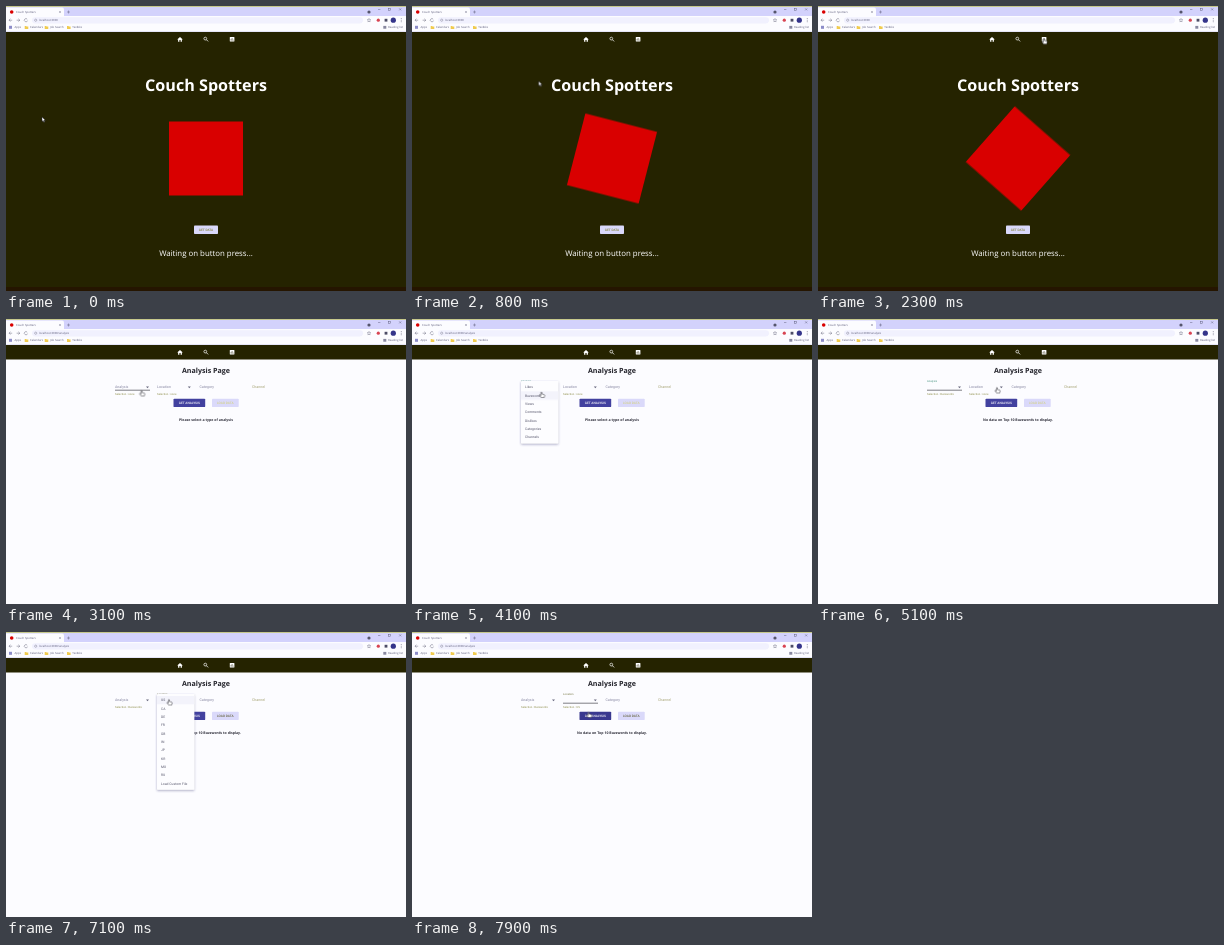
An HTML page that plays this animation: 400 px wide and 285 px high, repeating every 8 s.

```html
<!DOCTYPE html>
<html lang="en">
<head>
<meta charset="utf-8">
<title>Couch Spotters</title>
<style>
html, body { margin: 0; width: 100%; height: 100%; overflow: hidden; background: #fcfcff; }
svg { display: block; width: 100vw; height: 100vh; }
text { font-family: "Open Sans", "Noto Sans", sans-serif; text-rendering: geometricPrecision; }
.mid { text-anchor: middle; }
.ui { font-family: Roboto, Arial, sans-serif; }
.chrome text { font-size: 2.8px; fill: #5a5a78; }
.title { font-weight: 700; }
.msg { font-size: 3.52px; font-weight: 700; fill: #2c2c38; }
.btn { font-size: 3.2px; font-weight: 500; }
.label { font-size: 3.6px; fill: #83839f; }
.help { font-size: 2.75px; fill: #8c8c48; }
.menu text { font-size: 3.4px; fill: #55556a; }

/* one 8 s loop; 1.25% is one 100 ms step */
.home, .page, .before, .after, .before2, .after2, .line1, .line2,
.arrow, .hand, .hover, .pick1, .pick2 { animation: 8s step-end infinite; }
.home { animation-name: home; }
.page { animation-name: page; }
.before { animation-name: before; }
.after { animation-name: after; }
.before2 { animation-name: before2; }
.after2 { animation-name: after2; }
.line1 { animation-name: line1; }
.line2 { animation-name: line2; }
.arrow { animation-name: arrow; }
.hand { animation-name: hand; }
.hover { animation-name: hover; }
.pick1 { animation-name: pick1; }
.pick2 { animation-name: pick2; }
@keyframes home { 0% { opacity: 1 } 31.25%, to { opacity: 0 } }
@keyframes page { 0% { opacity: 0 } 31.25%, to { opacity: 1 } }
@keyframes before { 0% { opacity: 1 } 57.5%, to { opacity: 0 } }
@keyframes after { 0% { opacity: 0 } 57.5%, to { opacity: 1 } }
@keyframes before2 { 0% { opacity: 1 } 88.75%, to { opacity: 0 } }
@keyframes after2 { 0% { opacity: 0 } 88.75%, to { opacity: 1 } }
@keyframes line1 { 0% { opacity: 0 } 37.5% { opacity: 1 } 67.5%, to { opacity: 0 } }
@keyframes line2 { 0% { opacity: 0 } 67.5%, to { opacity: 1 } }
@keyframes arrow { 0% { opacity: 1 } 25% { opacity: 0 } 31.25% { opacity: 1 } 37.5%, to { opacity: 0 } }
@keyframes hand { 0% { opacity: 0 } 25% { opacity: 1 } 31.25% { opacity: 0 } 37.5%, to { opacity: 1 } }
@keyframes hover { 0% { fill: #42419f } 95%, to { fill: #39388f } }
@keyframes pick1 { 0% { transform: none } 51.25%, to { transform: translateY(8.35px) } }
@keyframes pick2 { 0% { transform: translateY(8.35px) } 82.5%, to { transform: none } }

.spin { animation: spin 8s steps(80) infinite; transform-origin: 200px 152.5px; }
@keyframes spin { to { transform: rotate(144deg) } }

.float1, .float2, .menu { animation: 8s steps(2) infinite; }
.float1 { animation-name: float1; transform-origin: 109px 69.4px; }
.float2 { animation-name: float2; transform-origin: 151px 69.4px; }
@keyframes float1 {
  0%, 43.75% { transform: none; fill: #83839f }
  46.25%, 67.5% { transform: translateY(-6px) scale(.75); fill: #43917c }
  70%, to { transform: none; fill: #83839f }
}
@keyframes float2 {
  0%, 67.5% { transform: none; fill: #83839f }
  70%, to { transform: translateY(-6px) scale(.75); fill: #6c6c34 }
}
.m1 { animation-name: menu1; transform-origin: 109px 62px; }
.m2 { animation-name: menu2; transform-origin: 151px 62px; }
@keyframes menu1 {
  0%, 42.5% { opacity: 0; transform: scale(.75, .56) }
  45%, 57.5% { opacity: 1; transform: none }
  60%, to { opacity: 0; transform: none }
}
@keyframes menu2 {
  0%, 67.5% { opacity: 0; transform: scale(.75, .56) }
  70%, 88.75% { opacity: 1; transform: none }
  91.25%, to { opacity: 0; transform: none }
}

.cursor { animation: cursor 8s infinite; }
@keyframes cursor {
  0% { transform: translate(36px, 111px) }
  3.75% { transform: translate(36px, 111px); animation-timing-function: steps(10) }
  16.25% { transform: translate(217.3px, 39.5px) }
  20% { transform: translate(217.3px, 39.5px); animation-timing-function: steps(4) }
  25% { transform: translate(226px, 32.5px) }
  31.25% { transform: translate(226px, 32.5px); animation-timing-function: steps(3) }
  35% { transform: translate(183px, 107px); animation-timing-function: steps(3) }
  38.75% { transform: translate(135.6px, 71.5px) }
  45% { transform: translate(135.6px, 71.5px); animation-timing-function: steps(5) }
  51.25% { transform: translate(129.5px, 73px); animation-timing-function: step-end }
  53.75% { transform: translate(129.5px, 74.5px) }
  57.5% { transform: translate(129.5px, 74.5px); animation-timing-function: steps(5) }
  63.75% { transform: translate(179px, 68.5px) }
  67.5% { transform: translate(179px, 68.5px); animation-timing-function: steps(6) }
  75% { transform: translate(167px, 75px) }
  77.5% { transform: translate(167px, 75px); animation-timing-function: steps(4) }
  82.5% { transform: translate(163px, 67.5px) }
  90% { transform: translate(163px, 67.5px); animation-timing-function: steps(5) }
  96.25%, to { transform: translate(176.6px, 80px) }
}
</style>
</head>
<body>
<svg viewBox="0 0 400 285" preserveAspectRatio="none">
  <defs>
    <filter id="shade" x="-20%" y="-10%" width="140%" height="125%">
      <feDropShadow dx="0" dy="1" stdDeviation="1" flood-color="#40407a" flood-opacity=".45"/>
    </filter>
    <path id="drop" d="M-1.5 -.7h3l-1.5 1.6z" fill="#66667c"/>
    <path id="folder" d="M0 -1.3h1.4l.5.5h1.7v2.5h-3.6z" fill="#f0cb4e"/>
  </defs>

  <rect width="400" height="285" fill="#fcfcff"/>

  <g class="home">
    <rect y="26" width="400" height="259" fill="#252300"/>
    <rect y="281" width="400" height="4" fill="#251500"/>
    <text class="title mid" x="200" y="84.6" font-size="16.15" fill="#fff">Couch Spotters</text>
    <rect class="spin" x="163" y="115.5" width="74" height="74" fill="#d90000"/>
    <rect x="188" y="219.5" width="24" height="8.6" rx=".8" fill="#d9d8fa"/>
    <text class="btn ui mid" x="200" y="225" fill="#86853f">GET DATA</text>
    <text class="mid" x="200" y="249.6" font-size="7.85" fill="#fff">Waiting on button press...</text>
  </g>

  <g class="page">
    <rect y="26" width="400" height="14.5" fill="#252300"/>
    <text class="title mid" x="200" y="53.7" font-size="7.1" fill="#24242c">Analysis Page</text>

    <g class="ui">
      <text class="label ui float1" x="109" y="69.4">Analysis</text>
      <text class="label ui float2" x="151" y="69.4">Location</text>
      <text class="label ui" x="193.5" y="69.4">Category</text>
      <text class="label ui" x="246" y="69.4" style="fill:#a3a070">Channel</text>
      <use href="#drop" x="141.5" y="68.3"/>
      <use href="#drop" x="183.3" y="68.3"/>
      <path class="line1" d="M109 71.2h35" stroke="#4a4a50" stroke-width=".7"/>
      <path class="line2" d="M151 71.2h35" stroke="#4a4a50" stroke-width=".7"/>
      <text class="help ui before" x="109" y="75.6">Selection : none</text>
      <text class="help ui after" x="109" y="75.6">Selection : Buzzwords</text>
      <text class="help ui before2" x="151" y="75.6">Selection : none</text>
      <text class="help ui after2" x="151" y="75.6">Selection : US</text>
    </g>

    <rect class="hover" x="167.5" y="79.7" width="31.7" height="8.4" rx=".9" fill="#42419f"/>
    <text class="btn ui mid" x="183.3" y="85.1" fill="#fff">GET ANALYSIS</text>
    <rect x="206" y="79.7" width="26.7" height="8.4" rx=".9" fill="#dad9fa"/>
    <text class="btn ui mid before2" x="219.3" y="85.1" fill="#d3d288">LOAD DATA</text>
    <text class="btn ui mid after2" x="219.3" y="85.1" fill="#66653f">LOAD DATA</text>

    <text class="msg mid before" x="200" y="101.5">Please select a type of analysis</text>
    <text class="msg mid after" x="200" y="101.5">No data on Top 10 Buzzwords to display.</text>

    <g class="menu m1" data-x="109" data-pick="pick1" data-items="Likes,Buzzwords,Views,Comments,Dislikes,Categories,Channels"></g>
    <g class="menu m2" data-x="151" data-pick="pick2" data-items="US,CA,DE,FR,GB,IN,JP,KR,MX,RU,Load Custom File"></g>
  </g>

  <!-- navigation icons -->
  <g fill="#fff">
    <path d="M171.2 33.4l2.8-2.5 2.8 2.5h-.9v2.3h-1.3v-1.7h-1.2v1.7h-1.3v-2.3z"/>
    <circle cx="199.3" cy="32.6" r="1.4" fill="none" stroke="#fff" stroke-width=".7"/>
    <path d="M200.3 33.6l1.8 1.8" stroke="#fff" stroke-width=".8"/>
    <rect x="223.8" y="31" width="4.6" height="4.6" rx=".5"/>
    <path d="M225 34.6v-1.5M226.1 34.6v-2.6M227.2 34.6v-1" stroke="#252300" stroke-width=".5"/>
  </g>

  <!-- browser window -->
  <g class="chrome">
    <rect width="400" height="10" fill="#d3d2fc"/>
    <rect width="400" height="1" fill="#c6c88c"/>
    <path d="M0 10v-8.4h56q2 0 2 2v6.4z" fill="#fcfcff"/>
    <circle cx="5.7" cy="6" r="1.8" fill="#d90000"/>
    <text x="10" y="7">Couch Spotters</text>
    <path d="M53.2 5.2l1.6 1.6m0-1.6l-1.6 1.6M61 6h3M62.5 4.5v3M372 3.5h2.4M393.2 2.4l2 2m0-2l-2 2" stroke="#5a5a78" stroke-width=".45"/>
    <rect x="382.4" y="2.4" width="2" height="2" fill="none" stroke="#5a5a78" stroke-width=".45"/>
    <circle cx="363" cy="6" r="1.6" fill="#55556c"/>

    <rect y="10" width="400" height="16" fill="#fcfcff"/>
    <rect x="26" y="11.2" width="331" height="6.2" rx="3.1" fill="#f1f1fe"/>
    <path d="M6.2 14.2h-3.2m1.4-1.4l-1.4 1.4 1.4 1.4M10.6 14.2h3.2m-1.4-1.4l1.4 1.4-1.4 1.4" fill="none" stroke="#66667c" stroke-width=".5"/>
    <path d="M21.2 13.2a1.6 1.6 0 1 0 .3 1.4" fill="none" stroke="#66667c" stroke-width=".5"/>
    <circle cx="29.7" cy="14.2" r="1.1" fill="none" stroke="#66667c" stroke-width=".4"/>
    <text class="home" x="33" y="15.3">localhost:3000</text>
    <text class="page" x="33" y="15.3">localhost:3000/analysis</text>
    <path d="M363 12.4l.5 1.2 1.3.1-1 .9.3 1.3-1.1-.7-1.1.7.3-1.3-1-.9 1.3-.1z" fill="none" stroke="#66667c" stroke-width=".4"/>
    <circle cx="372.3" cy="14.2" r="1.6" fill="#d84452"/>
    <rect x="378.6" y="12.8" width="2.8" height="2.8" fill="#4c4c66"/>
    <circle cx="387.3" cy="14.2" r="2.6" fill="#34348a"/>
    <path d="M395.3 12.2v4" stroke="#66667c" stroke-width=".7" stroke-dasharray=".8 .8"/>

    <rect x="3" y="19.8" width="3" height="3" fill="#8c8cc8"/>
    <text x="8.5" y="22.4">Apps</text>
    <use href="#folder" x="18.7" y="21.2"/><text x="24" y="22.4">Calendars</text>
    <use href="#folder" x="38.7" y="21.2"/><text x="44" y="22.4">Job Search</text>
    <use href="#folder" x="61" y="21.2"/><text x="66.3" y="22.4">Textbks</text>
    <rect x="377.3" y="19.9" width="3" height="2.8" fill="#8888a0"/>
    <text x="382" y="22.4">Reading list</text>
    <rect y="25.3" width="400" height=".7" fill="#dcdcf4"/>
  </g>

  <g class="cursor" fill="#fff" stroke="#22222c" stroke-width=".5" stroke-linejoin="round">
    <path class="arrow" d="M0 0v4.6l1.1-1 .8 1.7.8-.4-.8-1.6h1.5z"/>
    <path class="hand" d="M-.6 .4q.6-.8 1.1 0v1.7l2.2.5q.6.2.5 1l-.5 2h-3l-1.7-2.2q-.2-.8.6-.5l.8.6z"/>
  </g>
</svg>
<script>
const ROW = 8.35, TOP = 62;

function add(parent, tag, attrs, text = "") {
  const el = document.createElementNS("http://www.w3.org/2000/svg", tag);
  for (const key in attrs) el.setAttribute(key, attrs[key]);
  el.textContent = text;
  parent.append(el);
}

for (const menu of document.querySelectorAll(".menu")) {
  const x = +menu.dataset.x, items = menu.dataset.items.split(",");
  add(menu, "rect", { x, y: TOP, width: 37.3, height: items.length * ROW + 4, rx: 0.8, fill: "#fdfdff", filter: "url(#shade)" });
  add(menu, "rect", { class: menu.dataset.pick, x, y: TOP + 2, width: 37.3, height: ROW, fill: "#f3f3fb" });
  items.forEach((name, i) => add(menu, "text", { class: "ui", x: x + 4, y: TOP + 7.3 + i * ROW }, name));
}
</script>
</body>
</html>
```
